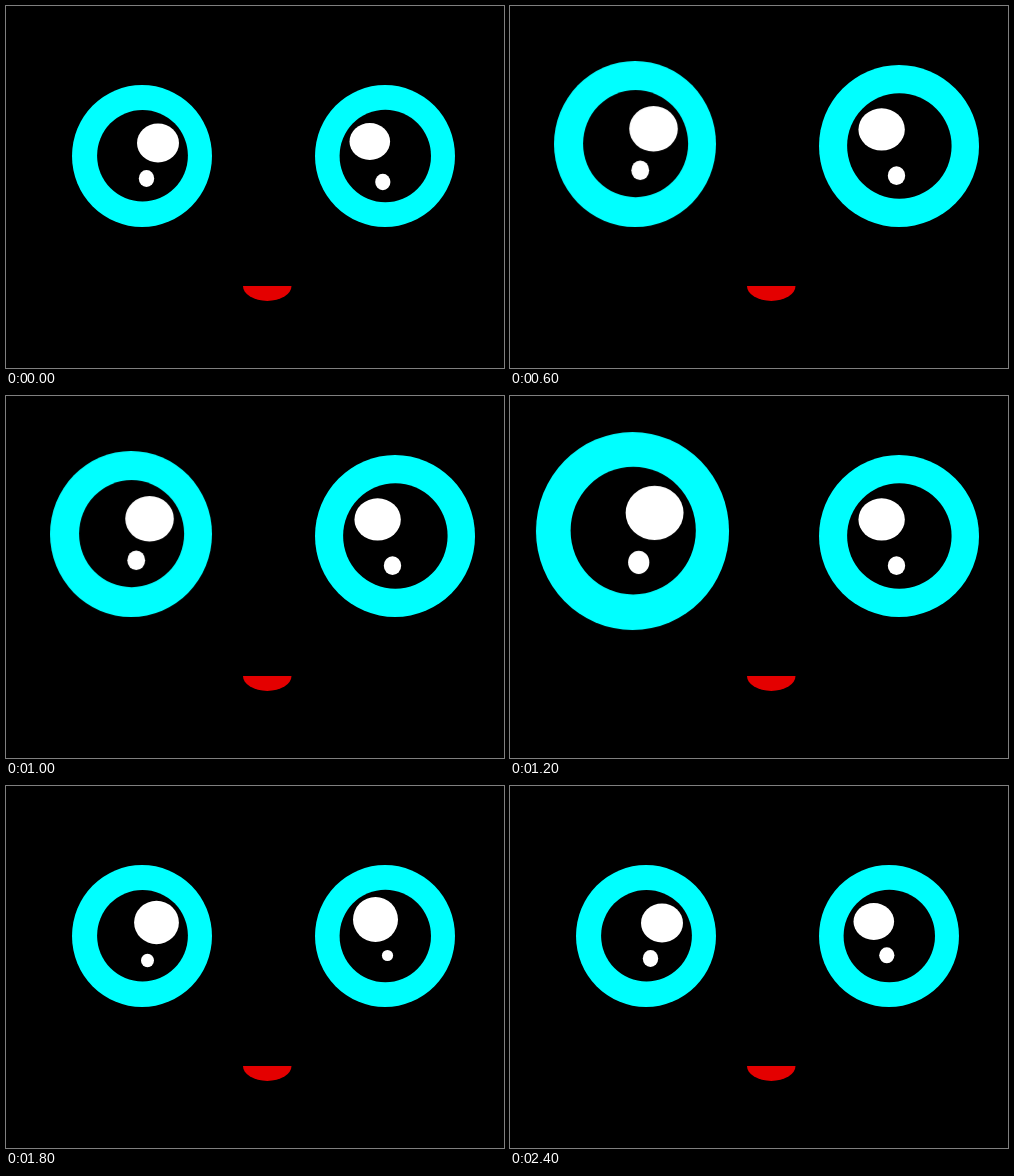
Animation, 498 px wide and 362 px high, one loop 2600 ms. Source, as an HTML page without scripts:

```html
<!DOCTYPE html>
<html lang="en">
<head>
<meta charset="utf-8">
<title>Blinking face</title>
<style>
  html, body { margin: 0; width: 100%; height: 100%; overflow: hidden; background: #000; }
  svg { display: block; width: 100%; height: 100%; }

  /* One loop is 13 beats of 200 ms; every pose is held, then cut. */
  .eye, .shine, .dot, .lids { animation: 2.6s step-end infinite; }
  .iris, .lids { fill: #0ff; }
  .shine, .dot { fill: #fff; }

  .left.eye { transform-origin: 206px 221px; animation-name: grow-left; }
  .right.eye { transform-origin: 309px 221px; animation-name: grow-right; }
  .left .shine { animation-name: shine-left; }
  .left .dot { animation-name: dot-left; }
  .right .shine { animation-name: shine-right; }
  .right .dot { animation-name: dot-right; }
  .lids { visibility: hidden; animation-name: close; }

  @keyframes grow-left {
    0%, 53.84%, 84.61% { transform: none; visibility: visible; }
    23.07%, 38.46% { transform: scale(1.157, 1.169); }
    30.76% { transform: scale(1.286, 1.303); }
    46.15% { transform: translate(13px, 13px) scale(1.379, 1.394); }
    76.92% { transform: none; visibility: hidden; }
  }
  @keyframes grow-right {
    0%, 53.84%, 84.61% { transform: none; visibility: visible; }
    23.07%, 38.46% { transform: scale(1.143, 1.141); }
    30.76% { transform: scale(1.221, 1.22); }
    46.15% { transform: scale(1.143, 1.141); }
    76.92% { transform: none; visibility: hidden; }
  }
  @keyframes close {
    76.92% { visibility: visible; }
    0%, 84.61% { visibility: hidden; }
  }

  @keyframes shine-left {
    0%, 23.07%, 53.84%, 76.92% { cx: 152px; cy: 137px; rx: 21px; ry: 19.5px; }
    15.38% { cx: 152px; cy: 137.5px; rx: 20px; ry: 18.5px; }
    61.53% { cx: 152px; cy: 138px; rx: 20.5px; ry: 20px; }
    69.23% { cx: 150.5px; cy: 136.5px; rx: 22.4px; ry: 21.7px; }
  }
  @keyframes shine-right {
    0%, 23.07%, 53.84%, 76.92% { cx: 363.8px; cy: 135.5px; rx: 20.3px; ry: 18.5px; }
    15.38% { cx: 364px; cy: 136px; rx: 19.5px; ry: 18px; }
    61.53% { cx: 371px; cy: 138px; rx: 21.5px; ry: 20.5px; }
    69.23% { cx: 369.5px; cy: 133.5px; rx: 22.5px; ry: 22.5px; }
  }
  @keyframes dot-left {
    0%, 23.07%, 53.84%, 76.92% { cx: 140.5px; cy: 172.5px; rx: 7.7px; ry: 8.4px; }
    15.38% { cx: 140.5px; cy: 172px; rx: 7px; ry: 7.5px; }
    61.53% { cx: 141px; cy: 174px; rx: 7px; ry: 7.5px; }
    69.23% { cx: 141.5px; cy: 174.5px; rx: 6.5px; ry: 6.7px; }
  }
  @keyframes dot-right {
    0%, 53.84% { cx: 376.8px; cy: 176px; rx: 7.6px; ry: 8.2px; }
    61.53% { cx: 379px; cy: 178px; rx: 7.2px; ry: 7.8px; }
    69.23% { cx: 381.5px; cy: 169.5px; rx: 5.6px; ry: 5.6px; }
    76.92% { cx: 376.8px; cy: 172.3px; rx: 7.6px; ry: 8px; }
    92.3% { cx: 376.8px; cy: 169.3px; rx: 7.6px; ry: 8px; }
  }
</style>
</head>
<body>
<svg viewBox="0 0 498 362" preserveAspectRatio="none">
  <rect width="498" height="362"/>

  <g class="left eye">
    <ellipse class="iris" cx="136" cy="150" rx="70" ry="71"/>
    <ellipse cx="136.5" cy="149.7" rx="45.4" ry="45.8"/>
    <ellipse class="shine" cx="152" cy="137" rx="21" ry="19.5"/>
    <ellipse class="dot" cx="140.5" cy="172.5" rx="7.7" ry="8.4"/>
  </g>

  <g class="right eye">
    <ellipse class="iris" cx="379" cy="150" rx="70" ry="71"/>
    <ellipse cx="379.3" cy="150" rx="45.7" ry="46.2"/>
    <ellipse class="shine" cx="363.8" cy="135.5" rx="20.3" ry="18.5"/>
    <ellipse class="dot" cx="376.8" cy="176" rx="7.6" ry="8.2"/>
  </g>

  <g class="lids">
    <ellipse cx="136" cy="166" rx="70" ry="7"/>
    <ellipse cx="379" cy="164" rx="70" ry="5"/>
  </g>

  <path fill="#e40000" d="M237 280H285.5A24.25 15 0 0 1 237 280Z"/>
</svg>
</body>
</html>
```
